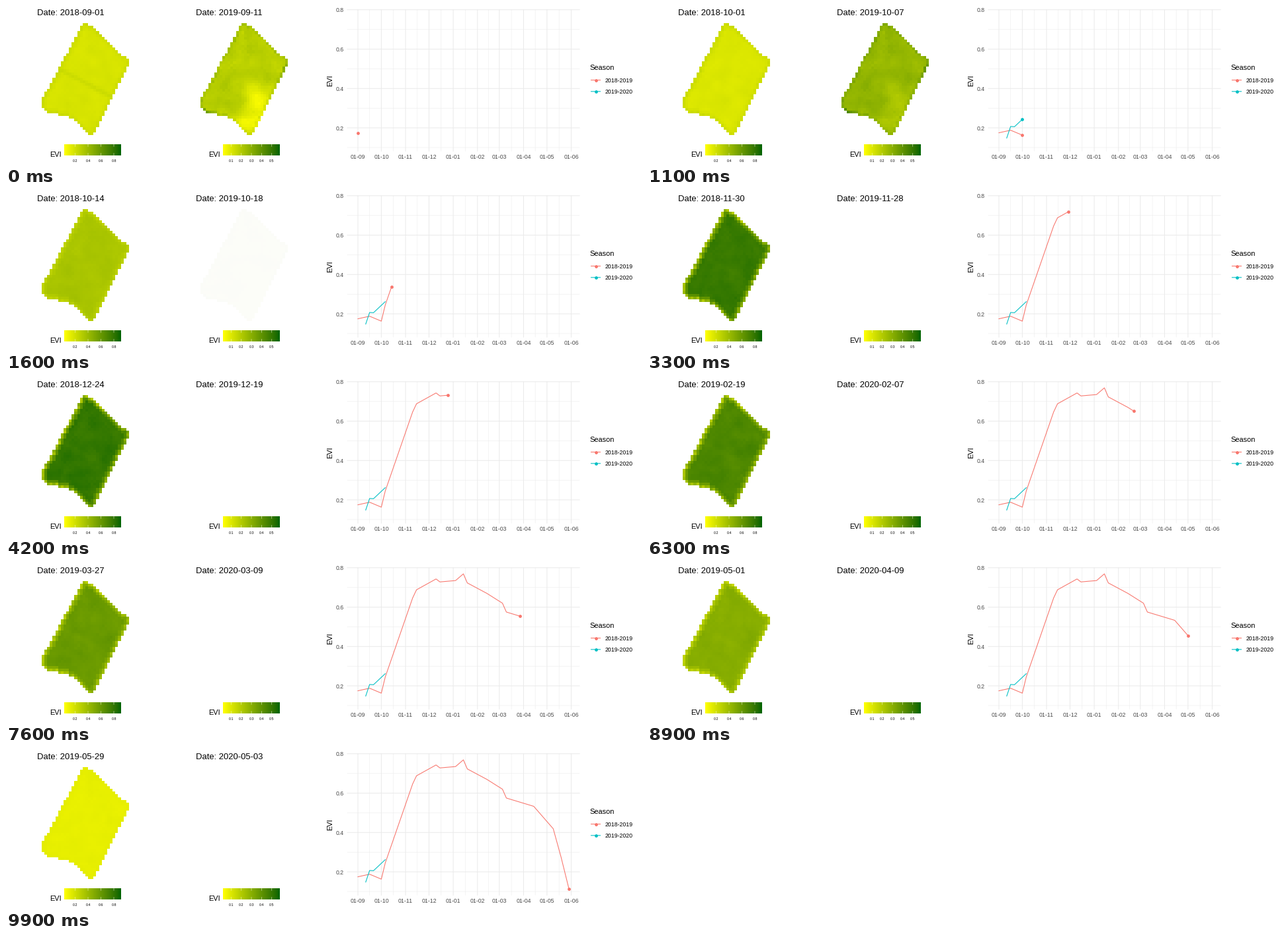
Recreate the animation shown at these times as a matplotlib script. Size 960x240 px, loop 10 s.

```python
import numpy as np
import matplotlib.pyplot as plt
from matplotlib.animation import FuncAnimation
from matplotlib.path import Path

W, H, DPI = 960, 240, 100
PX = 72 / DPI
FRAMES, SPAN = 100, 270
LAST = FRAMES - 1
RED, TEAL, GRID, GREY = "#F8766D", "#00BFC4", "#EBEBEB", "#4D4D4D"
START_A, START_B = np.datetime64("2018-09-01"), np.datetime64("2019-09-11")
plt.rcParams["font.family"] = "Liberation Sans"

# Turning points: (days since 1 September, mean EVI)
SEASON_A = np.array([
    (0, .175), (15, .188), (30, .163), (35, .245), (70, .646), (75, .688),
    (100, .743), (105, .728), (125, .735), (135, .769), (140, .723),
    (165, .67), (185, .62), (190, .575), (225, .533), (250, .419),
    (260, .275), (270, .115)])
SEASON_B = np.array([(10, .148), (15, .207), (20, .206), (35, .262)])

fig = plt.figure(figsize=(W / DPI, H / DPI), dpi=DPI, facecolor="white")
ax = fig.add_axes([0, 0, 1, 1])


def day_x(day):
    return 532 + 1.1813 * np.asarray(day)


def evi_y(evi):
    return 5.7 + 299 * (0.8 - np.asarray(evi))


def label(x, y, s, size, color="black", ha="left"):
    return ax.text(x, y + 0.358 * size, s, fontsize=size * PX, color=color,
                   ha=ha, va="baseline")


def line(xs, ys, color, width, **kw):
    return ax.plot(xs, ys, color=color, lw=width * PX, snap=False, **kw)[0]


def dot(x, y, color):
    return ax.plot([x], [y], "o", ms=4.8 * PX, mew=0, color=color,
                   snap=False, zorder=4)[0]


def image(data, x0, x1, y0, y1):
    e = 0.02  # keeps the edges from spilling into the next pixel
    return ax.imshow(data, extent=(x0 + e, x1 - e, y1 - e, y0 + e),
                     aspect="auto", interpolation="nearest", zorder=2)


def ramp(t):
    """Yellow to dark green, blended in CIE Lab."""
    t = np.clip(t, 0, 1)[..., None]
    lab = (1 - t) * [97.14, -21.55, 94.48] + t * [36.15, -43.3, 41.8]
    fy = (lab[..., 0] + 16) / 116
    f = np.stack([fy + lab[..., 1] / 500, fy, fy - lab[..., 2] / 200], -1)
    xyz = np.where(f > 6 / 29, f ** 3, (f - 4 / 29) * 0.1284)
    xyz = xyz * [0.95047, 1, 1.08883]
    rgb = xyz @ np.array([[3.2406, -1.5372, -0.4986],
                          [-0.9689, 1.8758, 0.0415],
                          [0.0557, -0.2040, 1.0570]]).T
    rgb = np.clip(rgb, 0, 1)
    return np.where(rgb > 0.0031308,
                    1.055 * rgb ** (1 / 2.4) - 0.055, 12.92 * rgb)


# Field raster
COLS, ROWS = 32, 41
X0, X1, Y0, Y1 = 54, 186, 26, 196
OUTLINE = [(118, 23), (143, 41), (179, 77), (187, 80), (186, 90),
           (131, 200), (95, 167), (66, 163), (53, 152), (53, 145)]
gx, gy = np.meshgrid(X0 + (np.arange(COLS) + .5) * (X1 - X0) / COLS,
                     Y0 + (np.arange(ROWS) + .5) * (Y1 - Y0) / ROWS)
inside = Path(OUTLINE).contains_points(
    np.c_[gx.ravel(), gy.ravel()]).reshape(gx.shape)
rng = np.random.default_rng(7)


def neighbours(a, mode):
    p = np.pad(a, 1, mode=mode)
    return np.stack([a, p[:-2, 1:-1], p[2:, 1:-1], p[1:-1, :-2], p[1:-1, 2:]])


def erode(mask):
    return neighbours(mask, "constant").all(0)


def noise(passes):
    a = rng.normal(size=gx.shape)
    for _ in range(passes):
        a = neighbours(a, "edge").mean(0)
    return a / a.std()


def texture():
    return 0.7 * noise(5) + 0.4 * noise(1)


def blob(x, y, sx, sy):
    return np.exp(-((gx - x) / sx) ** 2 - ((gy - y) / sy) ** 2)


core = erode(inside)
rim, rim2 = inside & ~core, core & ~erode(core)
common = texture()
textures = np.array([0.6 * common + 0.7 * texture() for _ in SEASON_A])
west = gx + (gy - 110) / 2 < 120
edge_mix = (rim * np.where(west, .75, .55) * rng.uniform(.7, 1.2, gx.shape)
            + rim2 * np.where(west, .25, .15))
strip = np.exp(-((gy - 98 - (gx - 85) * 39 / 73) / 4) ** 2)
patch = np.clip(blob(142, 142, 22, 24) + blob(125, 180, 30, 18), 0, 1)
dark_rim = rim * (rng.uniform(0, .06, gx.shape)
                  + .13 * blob(64, 158, 10, 7) + .1 * blob(182, 98, 8, 12))


def snap(days):
    return np.round(days * LAST / SPAN)


knots_a, knots_b = snap(SEASON_A[:, 0]), snap(SEASON_B[:, 0])


def rgba(values, lo, hi, alpha=1.0):
    return np.dstack([ramp((values - lo) / (hi - lo)), inside * alpha])


def field_a(i):
    mean = np.interp(i, knots_a, SEASON_A[:, 1])
    pos = np.interp(i, knots_a, np.arange(len(knots_a)))
    k = min(int(pos), len(knots_a) - 2)
    tex = textures[k] + (pos - k) * (textures[k + 1] - textures[k])
    bare = np.interp(i, [0, 85, LAST], [.24, .24, .13])
    v = mean + 0.14 * max(mean - bare, 0) + (.004 + .03 * mean) * tex
    v = v + edge_mix * (bare - v)
    v = v + (.03 + .7 * max(0, 1 - i / 12)) * strip * (bare - v)
    return rgba(v, .03, .913)


def field_b(i):
    base = np.interp(i, [0, 2, 11], [.195, .235, .28])
    v = base + .018 * common - .14 * patch * max(.4, 1 - i / 18) + dark_rim
    return rgba(v, .022, .58, np.clip((16.15 - i) / 5.15, 0, 1))


def map_panel(x, ticks, first, step):
    title = label(47 + x, 9.5, "", 13)
    img = image(np.zeros((ROWS, COLS, 4)), X0 + x, X1 + x, Y0, Y1)
    label(66 + x, 225, "EVI", 11)
    image(ramp(np.linspace(0, 1, 86))[None], 88 + x, 174 + x, 210, 227)
    for k, v in enumerate(ticks):
        tx = first + k * step
        for y in (210, 223.6):
            line([tx, tx], [y, y + 3.4], "white", .5, zorder=3)
        label(tx, 235, f"{v:.1f}", 5.3, ha="center")
    return title, img


title_a, img_a = map_panel(0, np.arange(.2, .9, .2), 104.5, 19.5)
title_b, img_b = map_panel(240, np.arange(.1, .6, .1), 340.2, 15.4)

# Chart grid and axes
LEFT, RIGHT, TOP, BOTTOM = 516, 867, 5.5, 220.5
firsts = np.arange("2018-09", "2019-07", dtype="datetime64[M]").astype("datetime64[D]")
months = (firsts - START_A).astype(int)
for d in (months[1:] + months[:-1]) / 2:
    line([day_x(d)] * 2, [TOP, BOTTOM], GRID, .53)
for v in np.arange(.1, .8, .2):
    line([LEFT, RIGHT], [evi_y(v)] * 2, GRID, .53)
for day, d in zip(firsts, months):
    line([day_x(d)] * 2, [TOP, BOTTOM], GRID, 1.07)
    label(day_x(d), 229, f"01-{str(day)[5:7]}", 8.8, GREY, "center")
for v in np.arange(.2, .9, .2):
    line([LEFT, RIGHT], [evi_y(v)] * 2, GRID, 1.07)
    label(511, evi_y(v) + .3, f"{v:.1f}", 8.8, GREY, "right")
ax.text(495.5, 113.5, "EVI", fontsize=11 * PX, rotation=90,
        ha="right", va="center")

# Legend
label(882.4, 93, "Season", 11)
for y, color, s in ((112.5, RED, "2018-2019"), (129.8, TEAL, "2019-2020")):
    line([884.5, 898.5], [y, y], color, 1.07)
    dot(891.7, y, color)
    label(905.7, y + .3, s, 8.8)

curve_a = line([], [], RED, 1.07, zorder=3)
curve_b = line([], [], TEAL, 1.07, zorder=3)
dot_a, dot_b = dot(0, 0, RED), dot(0, 0, TEAL)

ax.set_xlim(0, W)
ax.set_ylim(H, 0)
ax.axis("off")


def reveal(i, knots, data, curve, point):
    started = i >= knots[0]
    now = [np.interp(i, knots, data[:, c]) for c in (0, 1)]
    pts = np.vstack([data[knots < i], now])
    curve.set_data(day_x(pts[:, 0]), evi_y(pts[:, 1]))
    curve.set_visible(started)
    point.set_data([day_x(now[0])], [evi_y(now[1])])
    point.set_visible(started and i <= knots[-1])


def update(i):
    title_a.set_text(f"Date: {START_A + SPAN * i // LAST}")
    title_b.set_text(f"Date: {START_B + 235 * i // LAST}")
    img_a.set_data(field_a(i))
    img_b.set_data(field_b(i))
    reveal(i, knots_a, SEASON_A, curve_a, dot_a)
    reveal(i, knots_b, SEASON_B, curve_b, dot_b)
    return title_a, title_b, img_a, img_b, curve_a, curve_b, dot_a, dot_b


anim = FuncAnimation(fig, update, frames=FRAMES, interval=100,
                     repeat=True, repeat_delay=0, blit=False)
plt.show()
```
